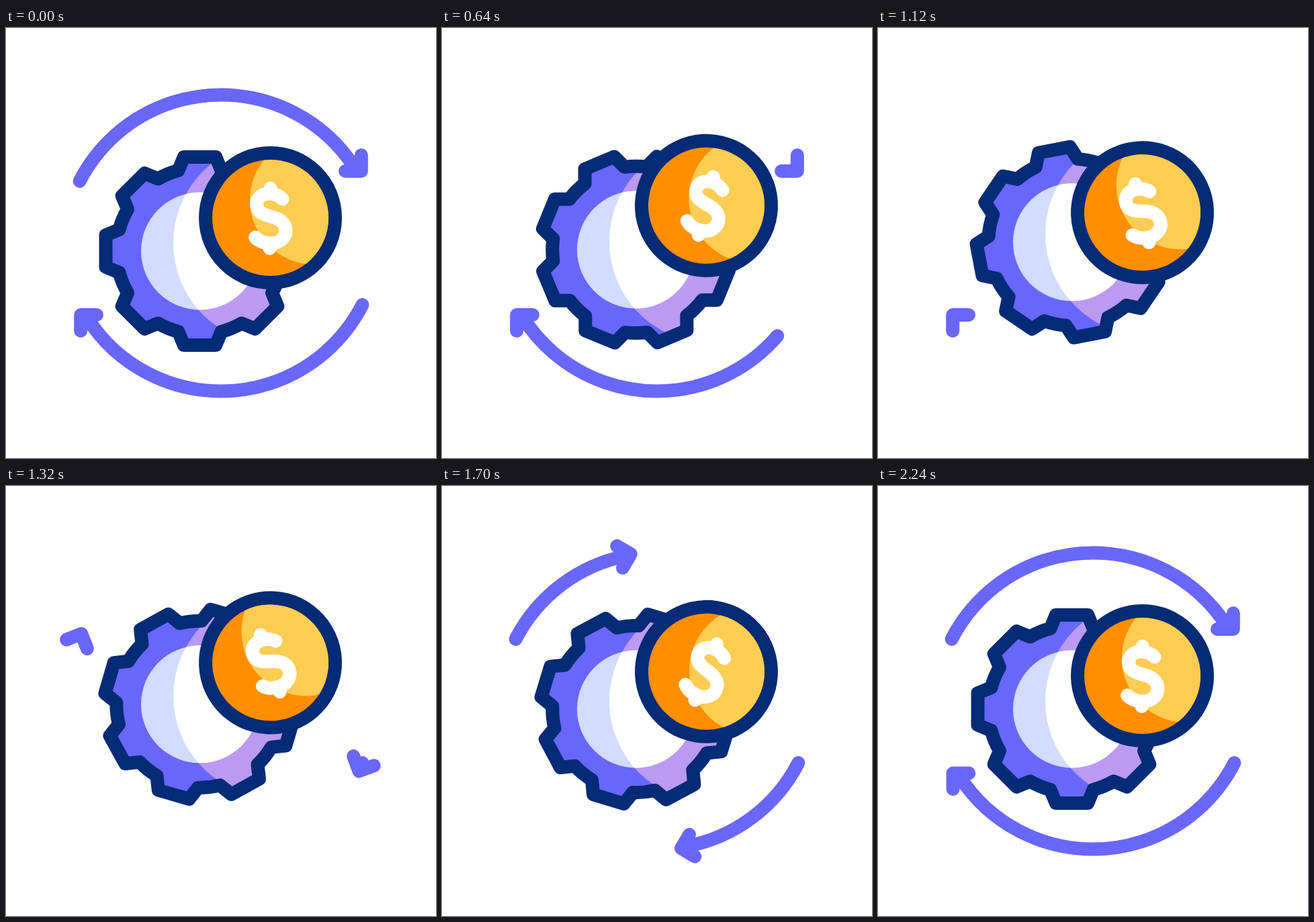
An HTML page with a canvas for the animation above (2400 ms loop, 640 by 640 pixels).

```html
<!DOCTYPE html>
<html>
<head>
<meta charset="utf-8">
<style>
html, body { margin: 0; width: 100%; height: 100%; overflow: hidden; background: #fff; }
canvas { display: block; width: 640px; height: 640px; }
</style>
</head>
<body>
<canvas id="stage" width="640" height="640"></canvas>
<script>
const ctx = document.getElementById('stage').getContext('2d');
const LOOP = 2400, REST = 2240, TAU = Math.PI * 2;
const VIOLET = '#6966fa', LILAC = '#bb9af2', NAVY = '#042b75', ICE = '#d2dcfe';
const ORANGE = '#ff8f00', YELLOW = '#fdcc53', WHITE = '#fff';

const rad = deg => deg * Math.PI / 180;
const clamp = u => Math.min(1, Math.max(0, u));
const ease = u => u * u * (3 - 2 * u);
const progress = (t, from, to) => ease(clamp((t - from) / (to - from)));

// Repeated eased hops between two times; each hop rises and falls in `half` ms.
function hop(t, from, to, half, height) {
  if (t <= from || t >= to) return 0;
  const phase = ((t - from) / half) % 2;
  return -height * ease(phase < 1 ? phase : 2 - phase);
}

function keyed(t, keys) {
  let [t0, v0] = keys[0];
  for (const [t1, v1] of keys) {
    if (t < t1) return v0 + (v1 - v0) * progress(t, t0, t1);
    t0 = t1;
    v0 = v1;
  }
  return v0;
}

const SWAY = [[400, 0], [845, 24.5], [1240, -24.5], [1635, 24.5], [2005, -24.5], [2200, 0]];

function at(x, y, deg, draw) {
  ctx.save();
  ctx.translate(x, y);
  ctx.rotate(rad(deg));
  draw();
  ctx.restore();
}

function disc(x, y, r, color) {
  ctx.beginPath();
  ctx.arc(x, y, r, 0, TAU);
  ctx.fillStyle = color;
  ctx.fill();
}

// Arc arrow above the stage centre; angles are in degrees clockwise from the top.
const ARC = { x: 0, y: 16, r: 236.5, start: -62.8, end: 59.5 };

function arrow(tail, tip) {
  ctx.strokeStyle = VIOLET;
  ctx.lineWidth = 20;
  if (tail < tip - 2) {
    ctx.beginPath();
    ctx.arc(ARC.x, ARC.y, ARC.r, rad(tail - 90), rad(tip - 92));
    ctx.stroke();
  }
  const late = Math.max(0, tip - 23.5);
  const r = ARC.r + 1.5 + late * 0.12;
  const x = ARC.x + r * Math.sin(rad(tip));
  const y = ARC.y - r * Math.cos(rad(tip));
  at(x, y, tip - 5.5 - late * 0.25, () => {
    ctx.beginPath();
    ctx.moveTo(-16.8, -16.8);
    ctx.lineTo(0, 0);
    ctx.lineTo(-16.8, 16.8);
    ctx.stroke();
  });
}

function cyclingArrow(t, turn, leave, left, enter, arrived) {
  const span = ARC.end - ARC.start;
  at(320, 320, turn, () => {
    if (t < left + 15) arrow(ARC.start + span * progress(t, leave, left), ARC.end);
    else if (t >= enter) arrow(ARC.start, ARC.start + span * progress(t, enter, arrived));
  });
}

function gearPath(turn) {
  const path = new Path2D();
  const base = Math.atan2(32, 120), baseR = Math.hypot(32, 120);
  for (let i = 0; i < 8; i++) {
    const a = rad(turn + i * 45), c = Math.cos(a), s = Math.sin(a);
    const point = (x, y) => path.lineTo(x * c - y * s, x * s + y * c);
    point(-32, -120);
    point(-23.75, -140);
    point(23.75, -140);
    point(32, -120);
    const up = a - Math.PI / 2;
    path.arc(0, 0, baseR, up + base, up + Math.PI / 4 - base);
  }
  path.closePath();
  return path;
}

function gear(t) {
  const outline = gearPath(180 * progress(t, 200, 2200));
  at(288.5, 332 + hop(t, 200, 1400, 200, 20.3), 0, () => {
    ctx.fillStyle = VIOLET;
    ctx.fill(outline);
    ctx.save();
    ctx.clip(outline);
    disc(111.5, -12, 151, LILAC);
    disc(0, 0, 87.5, ICE);
    ctx.clip();
    disc(111.5, -12, 151, WHITE);
    ctx.restore();
    ctx.strokeStyle = NAVY;
    ctx.lineWidth = 20;
    ctx.stroke(outline);
  });
}

const DOLLAR = new Path2D(
  'M18-28C12-34 5-36-2-36C-13-36-20.5-29-20.5-20C-20.5-9-11-5 0-2' +
  'C14 1 23 8 23 19C23 30 13 38 1 38C-8 38-17 35-22.5 29' +
  'M0-44V-36M-1 38V45.5');

function coin(t) {
  at(393.5, 282.5 + hop(t, 398, 2186, 298, 20), keyed(t, SWAY), () => {
    disc(0, 0, 106.5, NAVY);
    disc(0, 0, 86.5, ORANGE);
    ctx.save();
    ctx.clip();
    disc(65.4, -26.5, 96, YELLOW);
    ctx.restore();
    ctx.strokeStyle = WHITE;
    ctx.lineWidth = 20;
    ctx.stroke(DOLLAR);
  });
}

function render(now) {
  const t = Math.min(now % LOOP, REST);
  ctx.fillStyle = WHITE;
  ctx.fillRect(0, 0, 640, 640);
  ctx.lineCap = ctx.lineJoin = 'round';
  cyclingArrow(t, 0, 80, 680, 1245, 2240);
  cyclingArrow(t, 180, 516, 1116, 1220, 2260);
  gear(t);
  coin(t);
}

let began;
function tick(now) {
  began ??= now;
  render(now - began);
  requestAnimationFrame(tick);
}
render(0);
requestAnimationFrame(tick);
</script>
</body>
</html>
```
